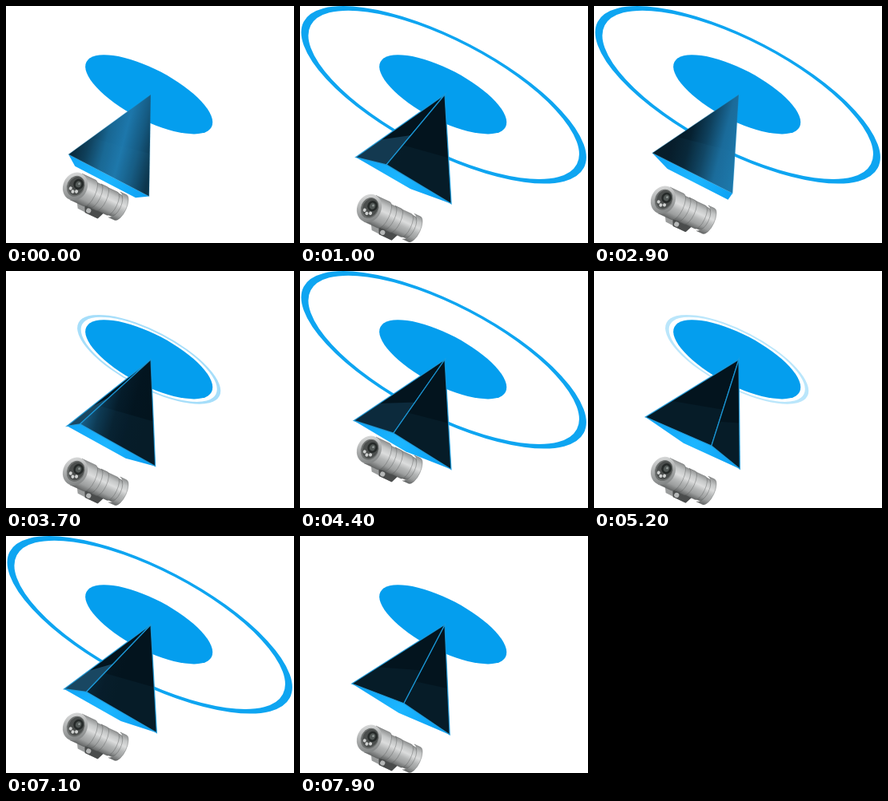
These frames come from a looping animation (360 by 297 pixels, 8 s). An HTML page with a canvas:

```html
<!DOCTYPE html>
<html lang="en">
<head>
<meta charset="utf-8">
<title>Rotating pyramid and camera</title>
<style>
  html, body { margin: 0; width: 100%; height: 100%; overflow: hidden; background: #fff; }
  canvas { display: block; width: 360px; height: 297px; }
</style>
</head>
<body>
<canvas id="stage" width="360" height="297"></canvas>
<script>
const ctx = document.getElementById('stage').getContext('2d');
const LOOP = 8000, STEP = 100;
const RAD = Math.PI / 180;
const TILT = 27.6 * RAD;
const BLUE = '#049eee';
const HUB = [178.7, 110.8];
const DISC = [88.2, 31.8];
const APEX = [181, 111];
const BASE = [126, 217];

const clamp = v => Math.max(0, Math.min(1, v));
const mod = (a, n) => ((a % n) + n) % n;
const bell = (v, width) => Math.exp(-((v / width) ** 2));
const lerp = (a, b, k) => a.map((v, i) => v + (b[i] - v) * k);
const rgb = c => 'rgb(' + c.map(Math.round) + ')';

function gradient(x0, y0, x1, y1, ...colors) {
  const g = ctx.createLinearGradient(x0, y0, x1, y1);
  colors.forEach((c, i) => g.addColorStop(i / (colors.length - 1), c));
  return g;
}

function poly(points, fill) {
  ctx.beginPath();
  points.forEach(p => ctx.lineTo(p[0], p[1]));
  ctx.closePath();
  if (fill) {
    ctx.fillStyle = fill;
    ctx.fill();
  }
}

function oval(x, y, rx, ry, fill, angle = 0) {
  ctx.beginPath();
  ctx.ellipse(x, y, rx, ry, angle, 0, 2 * Math.PI);
  ctx.fillStyle = fill;
  ctx.fill();
}

function drawRing(t) {
  const p = mod(t - 3680, 1510);
  const alpha = Math.min(clamp(0.45 + (p - 30) / 120), clamp((845 - p) / 80));
  if (!alpha) return;
  const grow = 1 - (1 - clamp((p - 30) / 230)) ** 2;
  const scale = 1.126 + 1.114 * grow;
  ctx.save();
  ctx.translate(HUB[0] + grow, HUB[1] + grow / 2);
  ctx.rotate(TILT);
  ctx.scale(DISC[0] * scale, DISC[1] * scale);
  ctx.globalAlpha = alpha;
  ctx.strokeStyle = '#0ea5f1';
  ctx.lineWidth = 0.05;
  ctx.beginPath();
  ctx.arc(0, 0, 0.975, 0, 2 * Math.PI);
  ctx.stroke();
  ctx.restore();
}

// Square base on a tilted orbit; the near side looks larger
function corner(angle) {
  const s = Math.sin(angle * RAD);
  const depth = 1 + 0.2 * s;
  const u = 69 * Math.cos(angle * RAD) / depth;
  const v = 6.5 * s / depth;
  return [BASE[0] + u * Math.cos(TILT) - v * Math.sin(TILT),
          BASE[1] + u * Math.sin(TILT) + v * Math.cos(TILT)];
}

function drawFace(angle) {
  const p = corner(angle), q = corner(angle + 90);
  const [ax, ay] = APEX;
  const cross = (p[0] - ax) * (q[1] - ay) - (p[1] - ay) * (q[0] - ax);
  if (cross >= 0) return;

  // A band of light sweeps across the face while it points at the viewer
  const heading = mod(angle + 45, 360);
  const band = 0.57 - (heading - 270) * 0.05;
  const shades = [0, 0.2, 0.4, 0.6, 0.8, 1].map(s =>
    rgb(lerp([3, 20, 30], [29, 120, 172], bell(s - band, 0.38))));
  poly([APEX, p, q], gradient(p[0], p[1], q[0], (p[1] + q[1]) / 2, ...shades));

  // Soft reflection across the lower part
  const shine = 0.07 + 0.4 * clamp((222 - heading) / 20);
  poly([lerp(APEX, p, 0.72), lerp(APEX, q, 0.58), q, p], `rgba(50,130,175,${shine})`);

  poly([APEX, p, q]);
  ctx.globalAlpha = 0.85 - 0.7 * bell(heading - 267, 12);
  ctx.strokeStyle = '#1c9fe2';
  ctx.lineWidth = 1.3;
  ctx.stroke();
  ctx.globalAlpha = 1;
}

function drawPyramid(t) {
  const turn = 45 + 0.02848 * t;
  const angles = [0, 90, 180, 270].map(a => a + turn);
  poly(angles.map(corner), gradient(75, 185, 180, 245, '#0fa4f6', '#1cb6ff', '#0a9ef2'));
  angles.forEach(drawFace);
}

function barrel(x0, x1, r, bulge) {
  ctx.beginPath();
  ctx.moveTo(x0, -r);
  ctx.lineTo(x1, -r);
  ctx.ellipse(x1, 0, bulge, r, 0, -Math.PI / 2, Math.PI / 2);
  ctx.lineTo(x0, r);
  ctx.ellipse(x0, 0, bulge, r, 0, Math.PI / 2, -Math.PI / 2, true);
  ctx.fillStyle = gradient(0, -r, 0, r,
    '#8f9191', '#c4c6c6', '#dcdddd', '#b4b6b6', '#9c9e9e', '#646666');
  ctx.fill();
  ctx.strokeStyle = 'rgba(85,88,88,0.5)';
  ctx.lineWidth = 0.7;
  ctx.stroke();
}

function drawCamera(t) {
  const bob = 17 * Math.cos((t - 1250) / 2140 * 2 * Math.PI);
  ctx.save();
  ctx.translate(86.5, 240.7 + bob);
  ctx.rotate(25 * RAD);
  ctx.scale(1.04, 1.03);

  poly([[8, 13], [14, 23], [40, 24], [46, 12]], '#9a9c9c');
  poly([[20, 16], [24, 24], [41, 24], [45, 14]], '#4a4c4c');
  oval(27, 20, 3, 3, '#b5b7b7');

  barrel(52, 60, 17, 7);
  barrel(48, 54, 14.5, 6);
  barrel(14, 49, 15.5, 6);
  barrel(27, 35, 16, 6);
  barrel(1, 19, 17.5, 7);

  oval(0, 0, 14.5, 17.5, gradient(-12, -14, 10, 16, '#dcdddd', '#a9abab', '#7c7f7f'));
  oval(0.5, -0.5, 10.5, 13, '#6c6f6e');
  oval(1, -1, 9, 11.5, '#4b4e4d');
  oval(2.5, -4, 6, 6.5, '#262a29');
  oval(2.5, -4, 3.4, 4, '#525856');
  oval(3, -5, 1.2, 1.4, '#949b99');
  [[-4, 4.5], [0, 7], [4, 5]].forEach(([x, y]) => oval(x, y, 1.9, 2.1, '#cfd1d0'));
  ctx.restore();
}

function frame(now) {
  const t = Math.floor((now % LOOP) / STEP) * STEP;
  ctx.fillStyle = '#fff';
  ctx.fillRect(0, 0, 360, 297);
  drawRing(t);
  oval(...HUB, ...DISC, BLUE, TILT);
  drawPyramid(t);
  drawCamera(t);
}

const start = performance.now();
function tick() {
  frame(performance.now() - start);
  requestAnimationFrame(tick);
}
tick();
</script>
</body>
</html>
```
